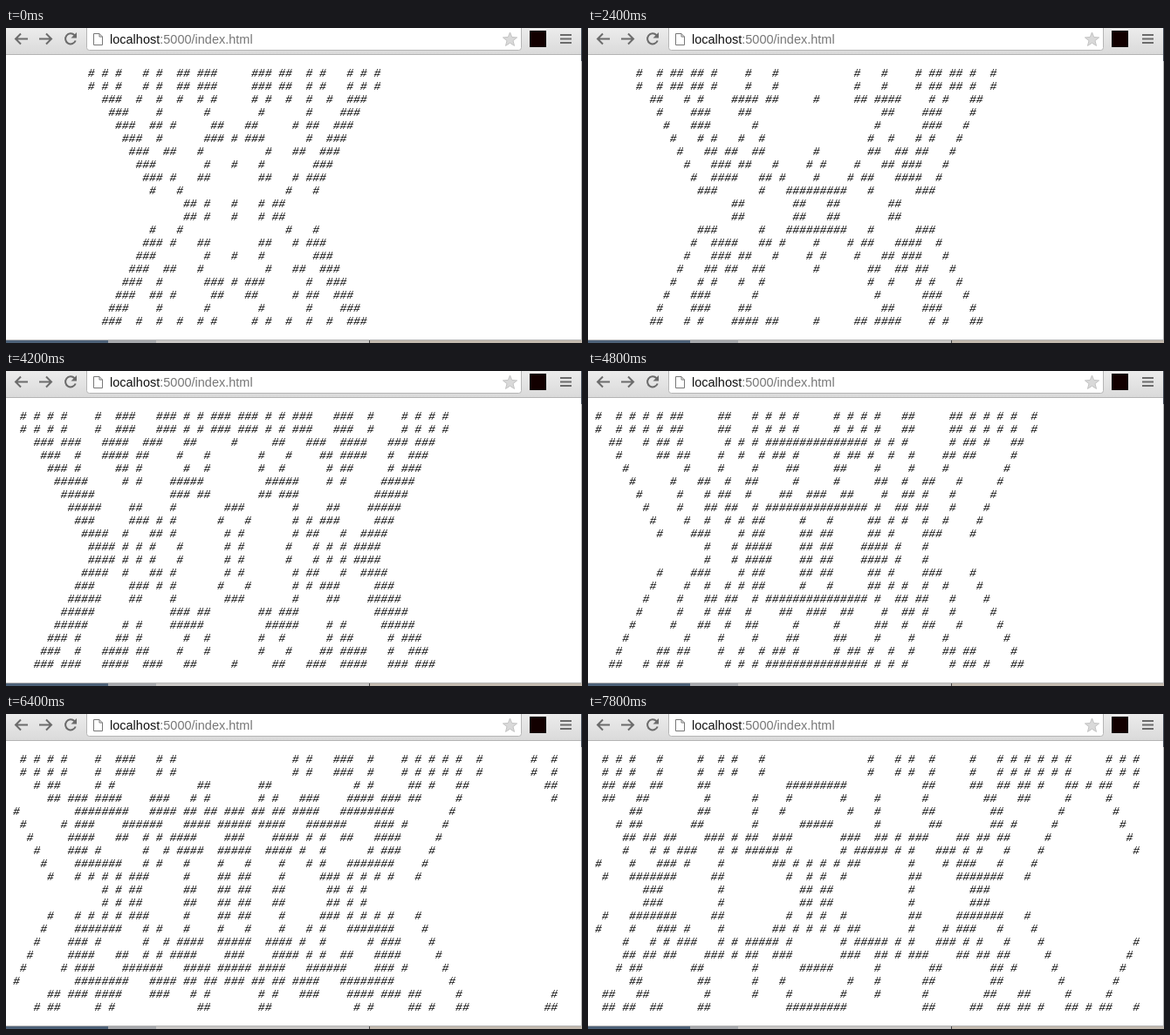
An HTML page for the animation above (8 s loop, 660 px wide and 362 px high).

```html
<!DOCTYPE html>
<html lang="en">
<head>
<meta charset="utf-8">
<title>Cellular automaton</title>
<style>
html, body { margin: 0; width: 100%; height: 100%; overflow: hidden; background: #fff; }
#stage { position: relative; width: 660px; height: 362px; overflow: hidden; background: #fff; }
#stage svg { position: absolute; left: 0; top: 0; }
#grid {
  position: absolute; left: 8px; top: 45px; margin: 0;
  font: italic 13px/15px "Liberation Mono", "Courier New", monospace;
  color: #000; white-space: pre;
}
</style>
</head>
<body>
<div id="stage">
  <svg width="660" height="362" viewBox="0 0 660 362">
    <defs>
      <linearGradient id="bar" x1="0" y1="0" x2="0" y2="1">
        <stop offset="0" stop-color="#ececec"/>
        <stop offset="1" stop-color="#dadada"/>
      </linearGradient>
    </defs>
    <rect width="660" height="30" fill="url(#bar)"/>
    <rect y="30" width="660" height="1" fill="#b4b4b4"/>
    <rect x="92.5" y="-6.5" width="498" height="32" rx="3" fill="#fff" stroke="#b5b5b5"/>

    <g fill="none" stroke="#6b6b6b" stroke-width="2">
      <path d="M25 12.5H11.5M17 6.5L11 12.5L17 18.5"/>
      <path d="M38 12.5H51.5M46 6.5L52 12.5L46 18.5"/>
      <path d="M78.5 8.3A6 6 0 1 0 79.7 14.5"/>
      <path d="M635 8H648M635 12.5H648M635 17H648"/>
    </g>
    <path d="M81 5V11.5H74.5Z" fill="#6b6b6b"/>

    <path d="M100.500 6.500H107L110.500 10V19.500H100.500ZM107 6.500V10H110.500" fill="#fff" stroke="#777"/>
    <text x="119" y="18" font-family="'Liberation Sans', Arial, sans-serif" font-size="14.5" fill="#111">localhost<tspan fill="#777">:5000/index.html</tspan></text>
    <path id="star" fill="#d9d9d9" stroke="#c4c4c4"/>
    <rect x="600" y="3" width="19" height="19" fill="#120000"/>

    <rect x="659" y="31" width="1" height="328" fill="#b0b0b0"/>
    <rect x="659" width="1" height="38" fill="#3c4450"/>
    <g id="desk">
      <rect y="359" width="660" height="3" fill="#c9c7c5"/>
      <rect y="359" width="117" height="3" fill="#4d6178"/>
      <rect x="117" y="359" width="55" height="3" fill="#a6a8ac"/>
      <rect x="417" y="359" width="243" height="3" fill="#c2b9ae"/>
      <rect x="416" y="359" width="1" height="3" fill="#444"/>
      <rect y="358" width="660" height="1" fill="#b5b5b5"/>
    </g>
  </svg>
  <pre id="grid"></pre>
</div>
<script>
const COLS = 80, ROWS = 20, AXIS = 32;
const STEP = 400, LEAD = 200, LOOP = 8000, COUNT = 20;

// Live columns of one quarter; the rest follows by mirroring.
const seed = [
  [11, 13, 15, 19, 21, 24, 25, 27, 28, 29],
  [13, 14, 15, 18, 21, 24, 27, 29],
  [14, 15, 16, 21, 28],
  [15, 16, 17, 20, 21, 23, 29, 30],
  [16, 17, 18, 21, 28, 29, 30, 32],
  [17, 18, 19, 22, 23, 27],
  [18, 19, 20, 28, 32],
  [19, 20, 21, 23, 27, 28],
  [20, 24],
  [25, 26, 28, 32]
];

const emptyGrid = () => Array.from({ length: ROWS }, () => new Array(COLS).fill(0));

function firstGrid() {
  const g = emptyGrid();
  seed.forEach((cols, i) => {
    for (const c of cols)
      for (const r of [i + 1, (ROWS - i) % ROWS])
        g[r][c] = g[r][2 * AXIS - c] = 1;
  });
  return g;
}

function neighbours(g, r, c) {
  let n = -g[r][c];
  for (let dr = -1; dr <= 1; dr++)
    for (let dc = -1; dc <= 1; dc++)
      n += g[(r + dr + ROWS) % ROWS][(c + dc + COLS) % COLS];
  return n;
}

// A cell lives next whenever it has two or three neighbours.
const evolve = g => g.map((row, r) => row.map((_, c) => {
  const n = neighbours(g, r, c);
  return n === 2 || n === 3 ? 1 : 0;
}));

const toText = g => g.map(row => row.map(v => v ? "#" : " ").join("")).join("\n");

const pages = [];
for (let g = firstGrid(); pages.length < COUNT; g = evolve(g)) pages.push(toText(g));

const points = Array.from({ length: 10 }, (_, i) => {
  const a = i * Math.PI / 5, rad = i % 2 ? 3.7 : 8.5;
  return (577.5 + rad * Math.sin(a)).toFixed(1) + " " + (13.5 - rad * Math.cos(a)).toFixed(1);
});
document.getElementById("star").setAttribute("d", "M" + points.join("L") + "Z");

const pre = document.getElementById("grid");
const start = performance.now();
let shown = -1;

function draw(now) {
  const t = Math.max(0, now - start) % LOOP;
  const k = Math.max(0, Math.min(COUNT - 1, Math.floor((t - LEAD) / STEP)));
  if (k !== shown) pre.textContent = pages[shown = k];
  requestAnimationFrame(draw);
}
draw(start);
</script>
</body>
</html>
```
